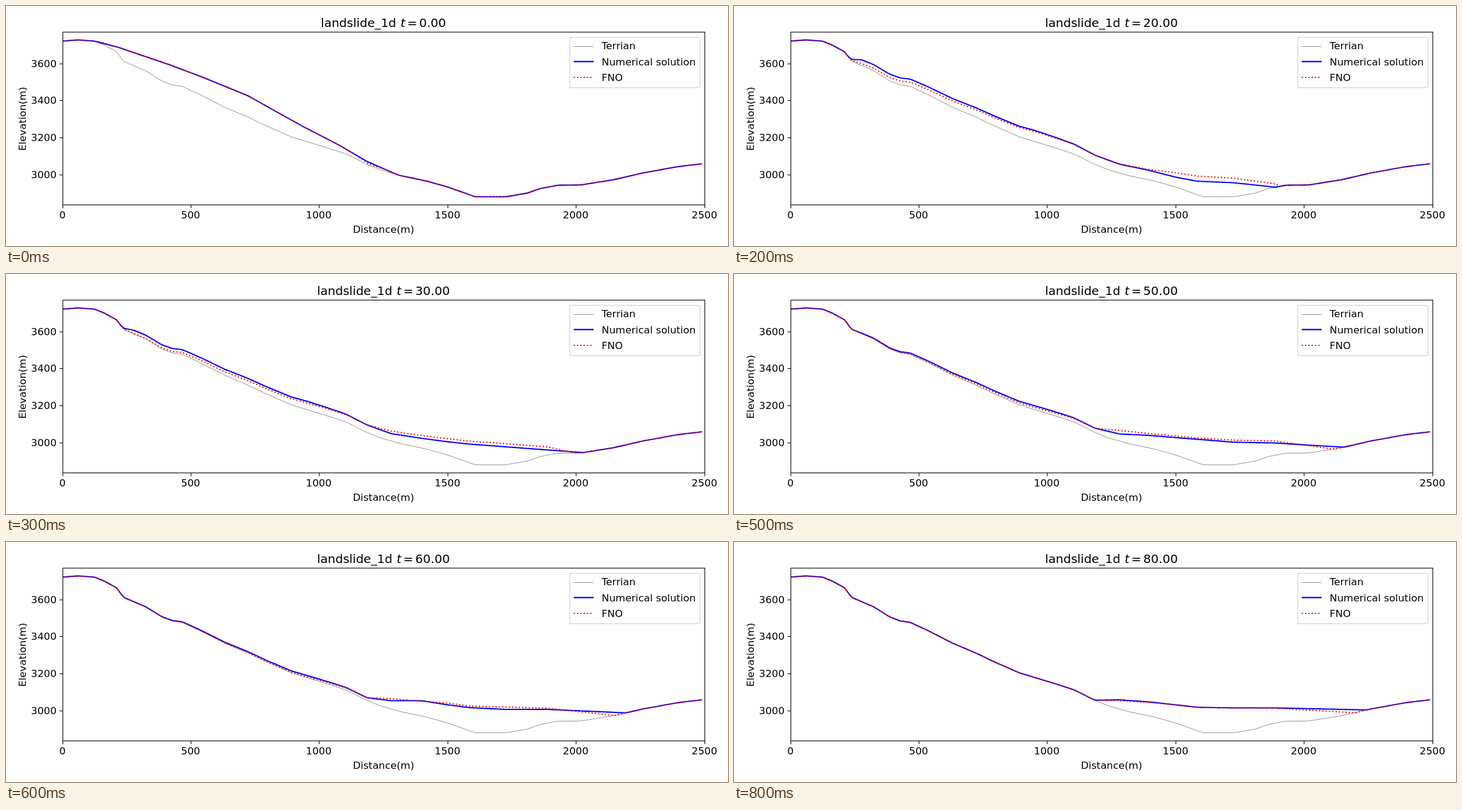
These frames come from a looping animation (1200 px wide and 400 px high, 900 ms). An HTML page:

```html
<!DOCTYPE html>
<html lang="en">
<head>
<meta charset="utf-8">
<title>Landslide profile</title>
<style>
  html, body { margin: 0; width: 100%; height: 100%; overflow: hidden; background: #fff; }
  svg { display: block; width: 1200px; height: 400px; }
  text { font: 16.67px "DejaVu Sans", sans-serif; fill: #000; }
  .title { font-size: 20px; }
  .mid { text-anchor: middle; }
  .end { text-anchor: end; }
  .axis { fill: none; stroke: #000; stroke-width: 1.1; }
  .line { fill: none; stroke-linejoin: round; }
  .terrain { stroke: #000; stroke-width: .45; }
  .solution { stroke: #00f; stroke-width: 2.08; }
  .model { stroke: #f00; stroke-width: 2.08; stroke-dasharray: 2.08 3.44; }
</style>
</head>
<body>
<svg viewBox="0 0 1200 400">
  <path id="terrain" class="line terrain"/>
  <path id="solution" class="line solution"/>
  <path id="model" class="line model"/>
  <rect class="axis" x="94.5" y="43.5" width="1067" height="288"/>
  <g id="ticks"></g>
  <text class="title mid" x="627.3" y="35">landslide_1d <tspan dx=".8" font-style="italic">t</tspan><tspan dx="3.25">=</tspan><tspan id="time" dx="3.25">0.00</tspan></text>
  <text class="mid" x="627.5" y="378">Distance(m)</text>
  <text class="mid" transform="translate(32.5 188) rotate(-90)">Elevation(m)</text>
  <rect x="937" y="52.3" width="216.5" height="84" rx="3.3" fill="#fff" fill-opacity=".8" stroke="#ccc" stroke-opacity=".8" stroke-width="1.39"/>
  <path class="line terrain" d="M943.5 67.5h33.3"/>
  <path class="line solution" d="M943.5 92.6h33.3"/>
  <path class="line model" d="M943.5 119h33.3"/>
  <text x="990" y="72">Terrian</text>
  <text x="990" y="99">Numerical solution</text>
  <text x="990" y="125">FNO</text>
</svg>
<script>
const $ = id => document.getElementById(id);
const STEP = 100, COUNT = 9;
const LEFT = 94, SCALE = .4268; // stage pixels per metre

// Key points as x,y in stage pixels
const ground = [
  94,58.5, 120,56.5, 147,58.5, 163,65, 184,76.5, 195,92, 232,108, 259,125,
  276,131.5, 293,134, 323,148, 364,169, 403,185.5, 433,200, 474,218, 536,237,
  565,246.5, 600,264, 622,273, 655,282.5, 700,292, 735,302, 780,318, 830,318,
  866,312, 887,304.5, 917,298.7, 955,298.3, 1010,289.5, 1055,279, 1115,268, 1157,263];
const initial = [147,58.5, 187,69, 272,98, 325,118, 403,150, 440,171, 494,201, 552,231, 600,259, 650,281];

// The pile: heights at fixed stations for a few times, filling the valley
const NECK = 600;
const stations = [640, 690, 735, 770, 830, 900];
const solution = {
  head: t => fade(21, t, 60, 1.9),
  toe: t => fade(29, t, 82, 1.6),
  front: t => 1075 - 298 * Math.exp(-t / 31.7),
  start: x => at(initial, x),
  pile: {
    10: [262, 276.5, 291, 308, 313.5, 301.5],
    20: [263.5, 274, 285.5, 292, 294.5, 302],
    40: [268.5, 273.5, 274, 275, 281.5, 284.5],
    60: [264.5, 264.5, 271.5, 276, 279, 279],
    80: [263, 266.5, 271.5, 275.5, 276.5, 276.5]
  }
};
const model = {
  head: t => fade(31, t, 30, 2),
  toe: t => fade(31, t, 75, 2),
  front: t => 1055 - 270 * Math.exp(-t / 33),
  start: x => at(initial, x) + 2.5 * bell(x, 605, 20) - 1.5 * bell(x, 159, 8),
  pile: {
    10: [262, 273.5, 288.5, 306.5, 312.5, 301.5],
    20: [263, 272.5, 278, 283.5, 287, 296.5],
    40: [260.5, 266, 271.5, 273.5, 278.5, 280],
    60: [261, 265.5, 268.5, 273.5, 275, 277],
    80: [264.5, 267.5, 271.5, 275.5, 276.5, 277]
  }
};

function fade(size, t, end, power) {
  return size * Math.max(0, 1 - t / end) ** power;
}

function bell(x, centre, width) {
  return Math.exp(-(((x - centre) / width) ** 2));
}

function at(pts, x) {
  if (x <= pts[0]) return pts[1];
  for (let i = 2; i < pts.length; i += 2) {
    if (x <= pts[i]) {
      const k = (x - pts[i - 2]) / (pts[i] - pts[i - 2]);
      return pts[i - 1] + k * (pts[i + 1] - pts[i - 1]);
    }
  }
  return pts[pts.length - 1];
}

const terrain = x => at(ground, x);

function surface(flow, t) {
  if (t === 0) return x => x > 147 && x < 650 ? flow.start(x) : terrain(x);

  const neck = fade(21.5, t, 82, 1.2);
  const layer = [188, 0, 212, flow.head(t), 500, flow.toe(t), NECK, neck];
  const front = flow.front(t);
  const before = flow.pile[t] || flow.pile[t - 10];
  const after = flow.pile[t] || flow.pile[t + 10];
  const pile = [NECK, terrain(NECK) - neck];
  stations.forEach((x, i) => {
    if (x < front) pile.push(x, (before[i] + after[i]) / 2);
  });
  pile.push(front, terrain(front));

  return x => x < NECK ? terrain(x) - at(layer, x)
    : x < front ? at(pile, x) : terrain(x);
}

function trace(y) {
  let d = "";
  for (let m = 0; m <= 2490; m += 10) {
    const x = LEFT + m * SCALE;
    d += (m ? "L" : "M") + x.toFixed(2) + " " + y(x).toFixed(2);
  }
  return d;
}

let ticks = "";
for (let i = 0; i < 6; i++) {
  const x = Math.floor(LEFT + i * 500 * SCALE) + .5;
  ticks += `<path class="axis" d="M${x} 332v5"/><text class="mid" x="${x - .7}" y="354">${i * 500}</text>`;
}
for (let i = 0; i < 4; i++) {
  const y = Math.floor(96.2 + i * 61.6) + .5;
  ticks += `<path class="axis" d="M94 ${y}h-5"/><text class="end" x="84" y="${y + 5.5}">${3600 - i * 200}</text>`;
}
$("ticks").innerHTML = ticks;
$("terrain").setAttribute("d", trace(terrain));

const scenes = Array.from({ length: COUNT }, (_, i) => ({
  solution: trace(surface(solution, i * 10)),
  model: trace(surface(model, i * 10))
}));
let shown = -1;

function draw() {
  const i = Math.floor(performance.now() / STEP) % COUNT;
  if (i !== shown) {
    shown = i;
    for (const id in scenes[i]) $(id).setAttribute("d", scenes[i][id]);
    $("time").textContent = (i * 10).toFixed(2);
  }
  requestAnimationFrame(draw);
}
draw();
</script>
</body>
</html>
```
